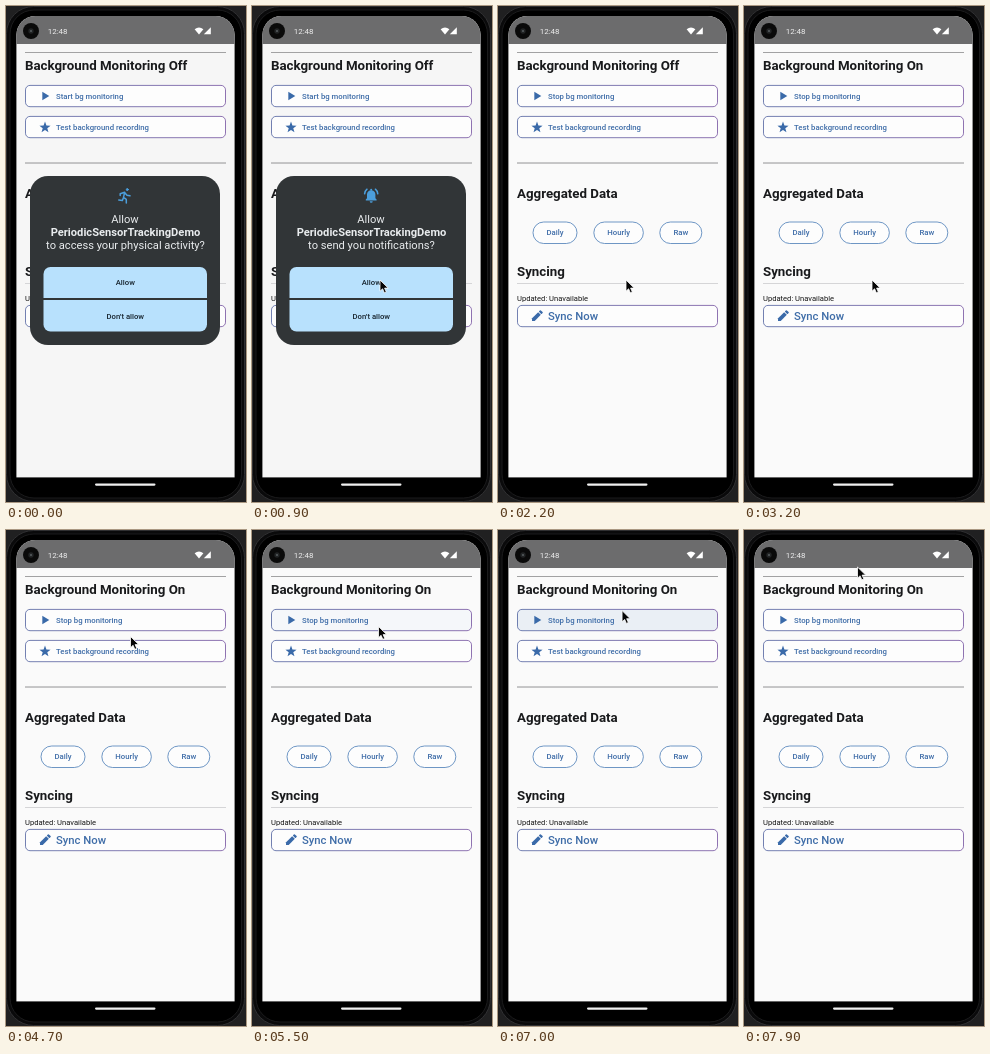
An HTML page for the animation above (8 s loop, 240x496 px).

```html
<!DOCTYPE html>
<html lang="en">
<head>
<meta charset="utf-8">
<title>Activity monitoring</title>
<style>
html, body { margin: 0; width: 100%; height: 100%; overflow: hidden; background: #202021; }
svg { display: block; width: 100%; height: 100%; font-family: Roboto, Inter, sans-serif; }
.title { font-size: 13.3px; font-weight: 700; fill: #191a1c; }
.label { font-size: 7.75px; font-weight: 500; fill: #3f6da8; }
.icon { fill: #3a6aa9; }
.card { fill: #fdfdfd; stroke: url(#edge); stroke-width: .85; }
.chip { fill: #fdfdfd; stroke: #5685bb; stroke-width: .85; }
.mid { text-anchor: middle; }
.ask { font-size: 11.15px; fill: #e9ecee; }
.choice { font-size: 7.7px; font-weight: 500; fill: #17242e; }
.glyph { fill: none; stroke: #4b9edb; stroke-width: 1.5; stroke-linecap: round; stroke-linejoin: round; }
.solid { fill: #4b9edb; }
</style>
</head>
<body>
<svg viewBox="0 0 240 496">
  <defs>
    <linearGradient id="edge" gradientUnits="userSpaceOnUse" x1="19" y1="0" x2="220" y2="0">
      <stop offset="0" stop-color="#5a6aa4"/>
      <stop offset="1" stop-color="#7b5aa4"/>
    </linearGradient>
    <clipPath id="screen"><rect x="10.4" y="10" width="218.2" height="500" rx="19"/></clipPath>
  </defs>

  <rect x=".5" y=".5" width="238" height="495" rx="27" fill="#0a0a0b" stroke="#303032"/>
  <rect x="4" y="4" width="231.5" height="488" rx="24" fill="#000" stroke="#1b1b1c"/>

  <g clip-path="url(#screen)">
    <rect id="page" x="10" y="10" width="219" height="461.4"/>
    <rect x="10" y="10" width="219" height="28" fill="#6c6c6d"/>
    <path d="M19 46.5H220" stroke="#a2a2a3"/>
    <path d="M19 157H220" stroke="#929294"/>
    <path d="M19 277.5H220" stroke="#d5d5d7"/>

    <text class="title" id="status" x="19" y="64.3"></text>
    <g id="cards"></g>
    <path class="icon" d="M36.3 85.8l7 4.2l-7 4.2z"/>
    <text class="label" id="toggle" x="50" y="92.6"></text>
    <path class="icon" id="star"/>
    <text class="label" x="50" y="123.7">Test background recording</text>

    <text class="title" x="19" y="191.8">Aggregated Data</text>
    <g id="chips"></g>
    <text class="title" x="19" y="270.3">Syncing</text>
    <text x="19" y="294.5" font-size="7.6" fill="#161616">Updated: Unavailable</text>
    <g class="icon" transform="translate(34 315) rotate(-45)">
      <path d="M0 0l2-1.9h8.6v3.8h-8.6z"/>
      <rect x="11.4" y="-1.9" width="2.4" height="3.8" rx=".7"/>
    </g>
    <text class="label" x="50" y="314" style="font-size:11.3px">Sync Now</text>
    <rect id="ripple" x="19.5" y="79.5" width="200" height="21" rx="4.5" fill="#3a6aa9"/>

    <g id="dialog">
      <rect x="24" y="170" width="190" height="169" rx="18" fill="#313537"/>
      <g class="glyph" id="runner" transform="translate(119 189)">
        <circle class="solid" cx="2.3" cy="-5.4" r="1" stroke-width="1"/>
        <path d="M-4.8 .6v-1.8l4.5-1.6l-1.2 5.2l2.8 2v3.6M-1.8 3.2l-.8 2.4l-3.6-.6M0-2l2 2.2l3 .6"/>
      </g>
      <g id="bell" transform="translate(119.2 189)">
        <path class="solid" d="M-5.4 5.5v-1l1.2-1.2v-3.8a4.2 4.2 0 0 1 8.4 0v3.8l1.2 1.2v1z"/>
        <circle class="solid" cy="-5.2" r="1"/>
        <path class="solid" d="M-1.5 6.3h3a1.5 1.5 0 0 1-3 0"/>
        <path class="glyph" d="M-6.6-1.2q.4-3 2.4-4.6M6.6-1.2q-.4-3-2.4-4.6"/>
      </g>
      <text class="ask mid" x="119" y="217">Allow</text>
      <text class="ask mid" x="119.5" y="230" font-weight="700">PeriodicSensorTrackingDemo</text>
      <text class="ask mid" id="request" x="119.5" y="243"></text>
      <rect x="37.5" y="261" width="163.5" height="64.5" rx="7" fill="#b8e1fd"/>
      <path d="M37 293H202" stroke="#313537" stroke-width="2"/>
      <rect id="press" x="37.5" y="261" width="163.5" height="31" rx="7" fill="#313537"/>
      <text class="choice mid" x="119.3" y="279.2">Allow</text>
      <text class="choice mid" x="119.3" y="312.6">Don’t allow</text>
    </g>
  </g>

  <circle cx="25" cy="25" r="8" fill="#0a0a0a"/>
  <circle cx="25" cy="25" r="2.7" fill="#222425"/>
  <circle cx="25" cy="25" r="1.1" fill="#555a5d"/>
  <text x="41.7" y="28" font-size="8" fill="#ececec">12:48</text>
  <path d="M188.6 23.2q4.4-3.4 8.8 0l-4.4 5.2z" fill="#fff"/>
  <path d="M197.8 28.3l7-7v7z" fill="#fff"/>
  <rect x="89" y="477.4" width="60.5" height="2.3" rx="1.1" fill="#f0f0f0"/>

  <path id="cursor" d="M0 0v11.2l2.6-2.4l1.7 4l2-.9l-1.7-3.8h3.6z" fill="#050505" stroke="#fff" stroke-width=".8" stroke-linejoin="round"/>
</svg>

<script>
const LOOP = 8000, STEP = 100;
const get = id => document.getElementById(id);

const card = y => `<rect class="card" x="19.5" y="${y}" width="200" height="21.3" rx="4.5"/>`;
const chip = (name, x, width) =>
  `<rect class="chip" x="${x - width / 2}" y="216" width="${width}" height="21.5" rx="10.7"/>
   <text class="label mid" x="${x}" y="229.2">${name}</text>`;

get('cards').innerHTML = card(79.4) + card(110.4) + card(299.4);
get('chips').innerHTML = chip('Daily', 57, 44) + chip('Hourly', 120.6, 49.5) + chip('Raw', 182.8, 42);

get('star').setAttribute('d', 'M' + Array.from({ length: 10 }, (_, i) => {
  const r = i % 2 ? 2.4 : 5.9, a = (i / 5 - .5) * Math.PI;
  return [39 + r * Math.cos(a), 121.5 + r * Math.sin(a)];
}).join('L') + 'Z');

const ramp = (t, from, to) => Math.min(1, Math.max(0, (t - from) / (to - from)));
const hump = (t, from, to) => Math.sin(Math.PI * ramp(t, from, to));

// Each move glides from the last resting point; bow bends the path sideways.
const rest = { x: 128, y: 274 };
const moves = [
  { from: 3300, to: 4100, x: 106, y: -16, bow: 12 },
  { from: 4200, to: 4700, x: 124.5, y: 106.5, bow: -3 },
  { from: 4800, to: 5100, x: 126.5, y: 96.5, bow: 0 },
  { from: 6900, to: 7700, x: 114, y: 15, bow: 0 },
  { from: 7700, to: 7900, x: 113.5, y: 37, bow: 0 }
];

function pointer(t) {
  let { x, y } = rest;
  for (const m of moves) {
    const k = Math.sin(ramp(t, m.from, m.to) * Math.PI / 2);
    x += (m.x - x) * k + m.bow * Math.sin(Math.PI * k);
    y += (m.y - y) * k;
  }
  return [x, y];
}

function dialogOpacity(t) {
  return 1 - ramp(t, 100, 300) + ramp(t, 400, 600) - ramp(t, 2100, 2200);
}

const runs = (t, start, stop, restart) => t >= start && t < stop || t >= restart;

function show(id, on) { get(id).style.display = on ? '' : 'none'; }

function draw(t) {
  const asksActivity = t < 350, fade = dialogOpacity(t);
  get('dialog').style.opacity = fade;
  get('page').setAttribute('fill', fade > .5 ? '#f6f6f6' : '#fafafa');
  show('runner', asksActivity);
  show('bell', !asksActivity);
  get('request').textContent = asksActivity ? 'to access your physical activity?' : 'to send you notifications?';
  get('press').style.opacity = .2 * hump(t, 900, 1200);
  get('ripple').style.opacity = .1 * (hump(t, 5400, 6200) + hump(t, 6500, 7300));
  get('toggle').textContent = (runs(t, 1200, 5700, 6800) ? 'Stop' : 'Start') + ' bg monitoring';
  get('status').textContent = 'Background Monitoring ' + (runs(t, 2500, 5800, 7000) ? 'On' : 'Off');
  get('cursor').setAttribute('transform', `translate(${pointer(t)})`);
  show('cursor', t >= STEP);
}

const start = performance.now();
function tick() {
  const t = (performance.now() - start) % LOOP;
  draw(Math.floor(t / STEP) * STEP);
  requestAnimationFrame(tick);
}
tick();
</script>
</body>
</html>
```
